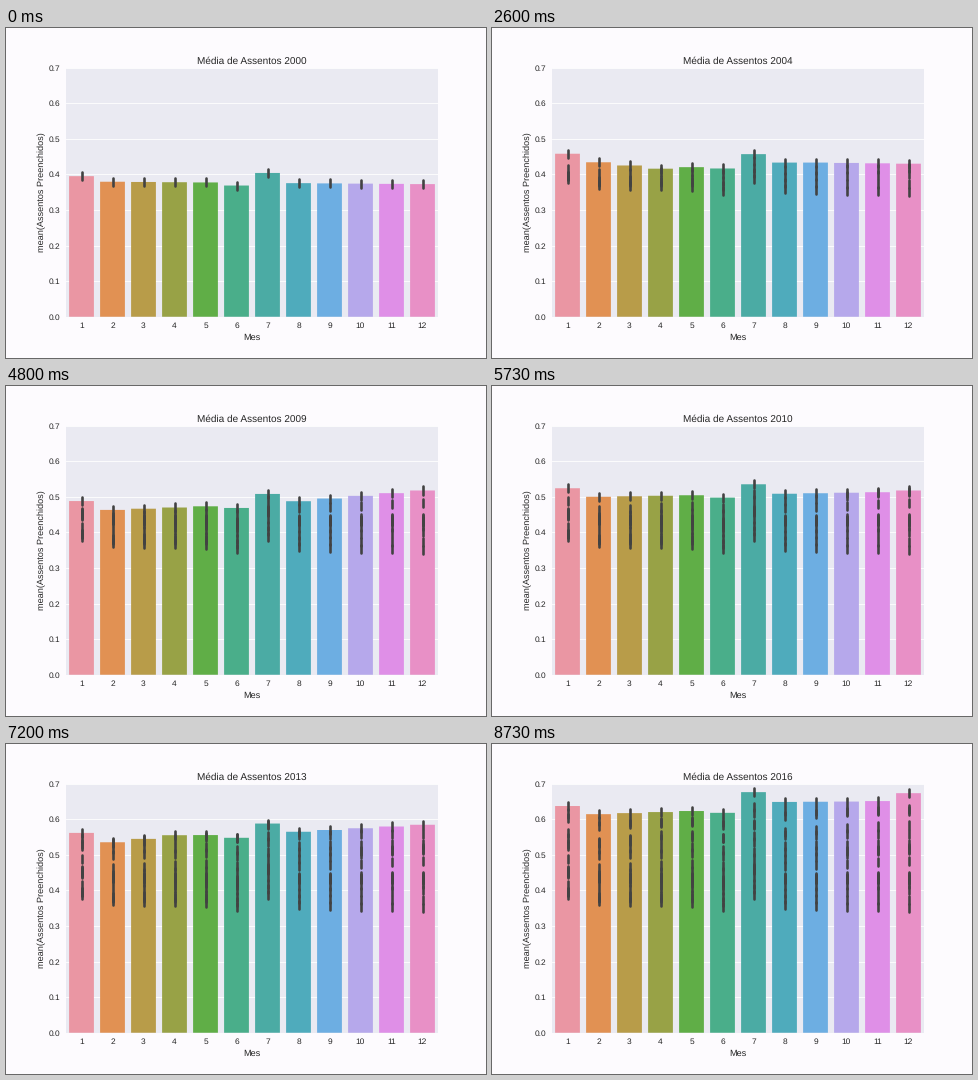
A matplotlib script for the animation above (9.07 s loop, 480x330 px).

```python
import colorsys

import numpy as np
import matplotlib.pyplot as plt
from matplotlib.animation import FuncAnimation
from matplotlib.collections import LineCollection

LOOP_MS = 9070
FRAMES = 273
FRAMES_PER_YEAR = 16
FIRST, LAST = 2000, 2016
CI = 0.0113
INK = "0.15"

# Turning points of the occupancy trend: (years since 2000, mean)
TREND = [
    (0, .380), (1, .372), (1.92, .350), (2, .380), (2.92, .400), (3.92, .418),
    (4, .443), (4.25, .416), (4.6, .434), (4.92, .430), (8, .440), (8.92, .483),
    (9.08, .463), (9.5, .480), (9.92, .518), (10.08, .500), (12.08, .534),
    (12.25, .555), (12.92, .558), (13.08, .535), (14.08, .594), (14.5, .590),
    (14.58, .622), (14.92, .622), (15.08, .580), (15.92, .630), (16.08, .614),
    (16.42, .626), (16.5, .648), (16.83, .650), (16.92, .674),
]
JANUARY, JUNE, JULY = 0, 5, 6

XYZ_TO_RGB = np.array([[3.2406, -1.5372, -0.4986],
                       [-0.9689, 1.8758, 0.0415],
                       [0.0557, -0.2040, 1.0570]])


def husl(hue, sat, light):
    """Convert HUSL (degrees, percent, percent) to RGB."""
    angle = np.radians(hue)
    sub = (light + 16) ** 3 / 1560896
    reach = []
    for a, b, c in XYZ_TO_RGB:
        for t in (0, 1):
            top1 = (284517 * a - 94839 * c) * sub
            top2 = ((838422 * c + 769860 * b + 731718 * a) * light * sub
                    - 769860 * t * light)
            bottom = (632260 * c - 126452 * b) * sub + 126452 * t
            length = top2 / bottom / (np.sin(angle) - top1 / bottom * np.cos(angle))
            if length > 0:
                reach.append(length)
    chroma = min(reach) * sat / 100
    u = chroma * np.cos(angle) / (13 * light) + 0.19783
    v = chroma * np.sin(angle) / (13 * light) + 0.46832
    y = ((light + 16) / 116) ** 3
    x = 9 * y * u / (4 * v)
    z = (9 * y - 15 * v * y - v * x) / (3 * v)
    rgb = np.clip(XYZ_TO_RGB @ [x, y, z], 0, 1)
    return np.where(rgb <= 0.0031308, 12.92 * rgb, 1.055 * rgb ** (1 / 2.4) - 0.055)


def muted(rgb, keep=0.75):
    h, l, s = colorsys.rgb_to_hls(*rgb)
    return colorsys.hls_to_rgb(h, l, s * keep)


months = np.arange(12)
years = np.arange(LAST - FIRST + 1)

# Trend plus holiday peaks in January and July and a lull in June
season = np.zeros(12)
season[[JANUARY, JUNE, JULY]] = 0.015, -0.008, 0.028
means = np.interp(years[:, None] + months / 12, *zip(*TREND)) + season
heights = np.maximum.accumulate(means)
colors = [muted(husl((0.01 + m / 12) * 359, 89.1, 69.3)) for m in months]

plt.rcParams.update({"font.family": "Liberation Sans", "text.hinting": "none"})
fig = plt.figure(figsize=(8, 5.5), dpi=60, facecolor="#fdfbfe")
ax = fig.add_axes([0.125, 0.125, 0.775, 0.755], facecolor="#eaeaf2")
ax.spines[:].set_visible(False)
ax.set_axisbelow(True)
ax.grid(axis="y", color="white", lw=1)
ax.set_xlim(-0.5, 11.5)
ax.set_ylim(0, 0.7)
ax.set_xticks(months, months + 1)
ax.set_yticks(np.arange(8) / 10)
ax.tick_params(length=0, pad=7, labelsize=10, labelcolor=INK)
ax.set_xlabel("Mes", fontsize=11, color=INK, labelpad=3.5)
ax.set_ylabel("mean(Assentos Preenchidos)", fontsize=11, color=INK, labelpad=3)
title = ax.set_title("", fontsize=12, color=INK, pad=5)

bars = ax.bar(months, heights[0], width=0.8, color=colors, lw=0, snap=False)
errors = LineCollection([], colors="0.26", linewidths=3.15, capstyle="round", zorder=3)
ax.add_collection(errors, autolim=False)


def intervals(count):
    return [[(m, v - CI), (m, v + CI)] for row in means[:count]
            for m, v in zip(months, row)]


def update(frame):
    step = min(frame // FRAMES_PER_YEAR, LAST - FIRST)
    for bar, h in zip(bars, heights[step]):
        bar.set_height(h)
    errors.set_segments(intervals(step + 1))
    title.set_text(f"Média de Assentos {FIRST + step}")
    return [*bars, errors, title]


anim = FuncAnimation(fig, update, frames=FRAMES, interval=LOOP_MS / FRAMES,
                     repeat=True, repeat_delay=0)
plt.show()
```
